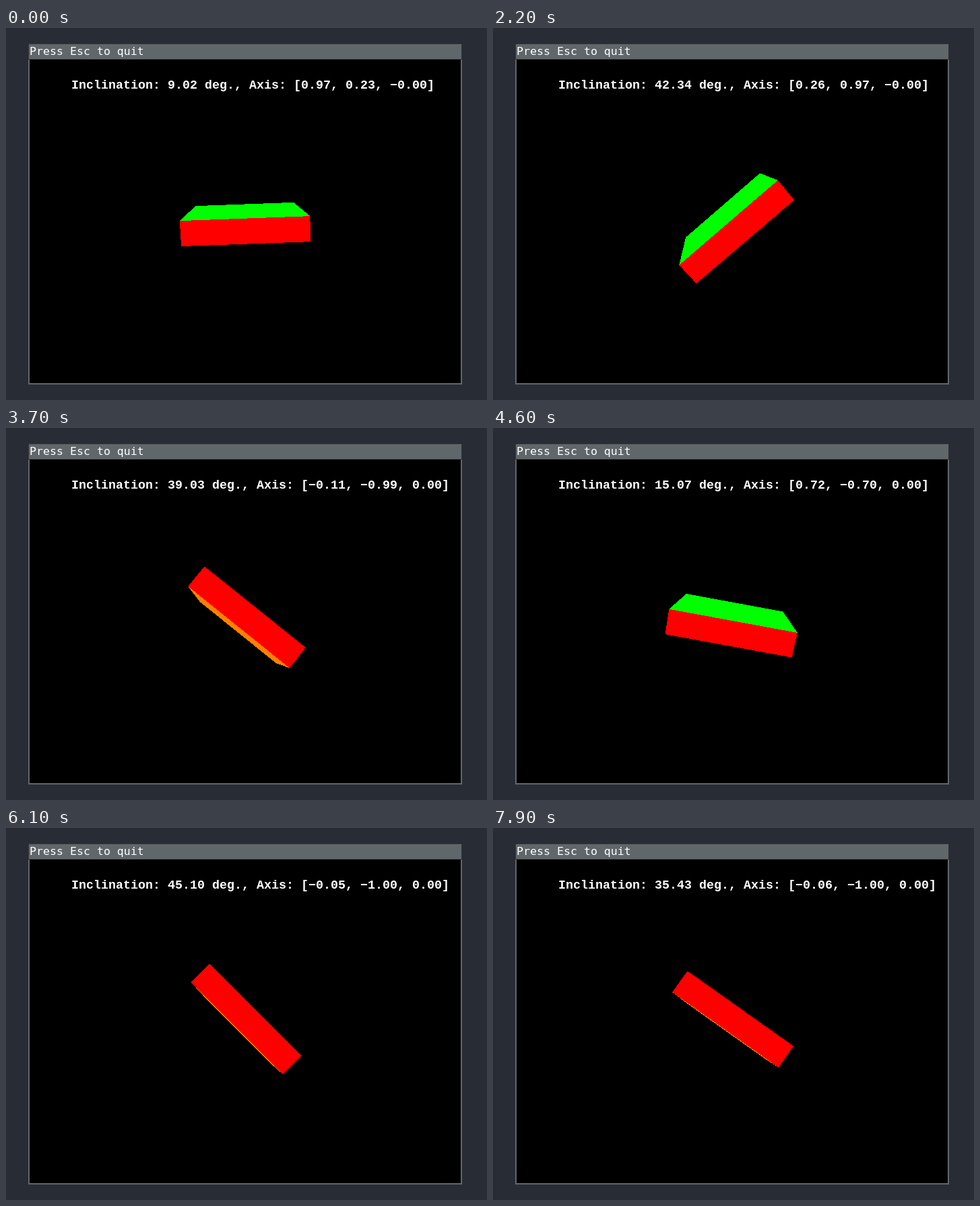
Write an HTML page that moves like this. It is 714 px wide and 552 px high and loops after 8 s.

```html
<!DOCTYPE html>
<html lang="en">
<head>
<meta charset="utf-8">
<title>Inclination viewer</title>
<style>
  html, body { margin: 0; width: 100%; height: 100%; overflow: hidden; background: #282c34; }
  svg { display: block; }
  text { fill: #fff; white-space: pre; }
  .title { font: 16.6px "DejaVu Sans Mono", monospace; }
  .readout { font: bold 18.333px "Liberation Mono", monospace; }
</style>
</head>
<body>
<svg width="714" height="552" viewBox="0 0 714 552">
  <g shape-rendering="crispEdges">
    <rect width="714" height="552" fill="#282c34"/>
    <rect x="33" y="47" width="644" height="482" fill="#5f676a"/>
    <rect x="33" y="23" width="644" height="24" fill="#333"/>
    <rect x="34" y="24" width="642" height="22" fill="#5f676a"/>
    <rect x="35" y="47" width="640" height="480"/>
    <g id="box"></g>
  </g>
  <text class="title" x="35" y="40">Press Esc to quit</text>
  <text class="readout" id="readout" x="97" y="90"></text>
</svg>
<script>
const LOOP = 8000, STEP = 100;
const CENTER = [355, 287], FOCAL = 240 / Math.tan(Math.PI / 8), DISTANCE = 7;
const HALF = [1, .2, 1];
const COLORS = ['#f0f', '#0f0', '#f00', '#00f', '#ff8000', '#ff0'];

// Key poses of the rocking hand: time, pitch, roll in degrees
const POSES = [
  [0, 8.778, 2.075], [1200, 21.969, -32.502], [1275, 22, -36],
  [2200, 11.008, 40.884], [2550, 12, 51], [3700, -4.293, -38.793],
  [4200, 10.5, -50], [5000, 10, 29], [5400, 3.721, 8.041], [6000, -4, -40],
  [6400, 7, -51], [6800, 4.691, -28.942], [7300, 3, 17], [7900, -2.126, -35.366]
];

const box = document.getElementById('box');
const readout = document.getElementById('readout');

// One face per axis and side, wound counter-clockwise seen from outside
const faces = COLORS.map((color, i) => {
  const axis = i % 3, side = i < 3 ? 1 : -1;
  const corners = [[-1, -1], [1, -1], [1, 1], [-1, 1]].map(([u, v]) => {
    const p = [];
    p[axis] = side * HALF[axis];
    p[(axis + 1) % 3] = side * u * HALF[(axis + 1) % 3];
    p[(axis + 2) % 3] = v * HALF[(axis + 2) % 3];
    return p;
  });
  const shape = document.createElementNS('http://www.w3.org/2000/svg', 'polygon');
  shape.setAttribute('fill', color);
  box.appendChild(shape);
  return { corners, shape };
});

// Flat at the ends and at turning points, otherwise the mean slope
function slope(i, col) {
  const a = POSES[i - 1], b = POSES[i], c = POSES[i + 1];
  if (!a || !c || (b[col] - a[col]) * (c[col] - b[col]) <= 0) return 0;
  return (c[col] - a[col]) / (c[0] - a[0]);
}

function sample(t, col) {
  const next = POSES.findIndex(p => p[0] > t);
  if (next < 0) return POSES[POSES.length - 1][col];
  const a = POSES[next - 1], b = POSES[next], span = b[0] - a[0];
  const u = (t - a[0]) / span, ease = u * u * (3 - 2 * u);
  return a[col] + (b[col] - a[col]) * ease +
    span * u * (1 - u) * (slope(next - 1, col) * (1 - u) - slope(next, col) * u);
}

// Most eighth readings repeat the one before.
function stepTime(t) {
  const i = Math.floor(t / STEP);
  const repeats = i % 8 === 3 && (i < 52 || i > 70);
  return (repeats ? i - 1 : i) * STEP;
}

function rotate([x, y, z], kx, kz, angle) {
  const c = Math.cos(angle), s = Math.sin(angle);
  const along = (kx * x + kz * z) * (1 - c);
  return [
    x * c - kz * y * s + kx * along,
    y * c + (kz * x - kx * z) * s,
    z * c + kx * y * s + kz * along
  ];
}

function project([x, y, z]) {
  const scale = FOCAL / (DISTANCE - z);
  return [CENTER[0] + x * scale, CENTER[1] - y * scale];
}

function facesViewer([a, b, c]) {
  return (b[0] - a[0]) * (c[1] - a[1]) < (b[1] - a[1]) * (c[0] - a[0]);
}

const num = v => v.toFixed(2).replace('-', '\u2212');

function draw(t) {
  const pitch = sample(t, 1), roll = sample(t, 2);
  const tilt = Math.hypot(pitch, roll), kx = pitch / tilt, kz = roll / tilt;
  for (const { corners, shape } of faces) {
    const points = corners.map(p => project(rotate(p, kx, kz, tilt * Math.PI / 180)));
    shape.setAttribute('points', facesViewer(points) ? points.join(' ') : '');
  }
  const zero = kz > 0 ? '\u22120.00' : '0.00';
  readout.textContent =
    `Inclination: ${num(tilt)} deg., Axis: [${num(kx)}, ${num(kz)}, ${zero}]`;
}

let start = null, shown = 0;
function tick(now) {
  start ??= now;
  const t = stepTime((now - start) % LOOP);
  if (t !== shown) draw(shown = t);
  requestAnimationFrame(tick);
}
draw(0);
requestAnimationFrame(tick);
</script>
</body>
</html>
```
